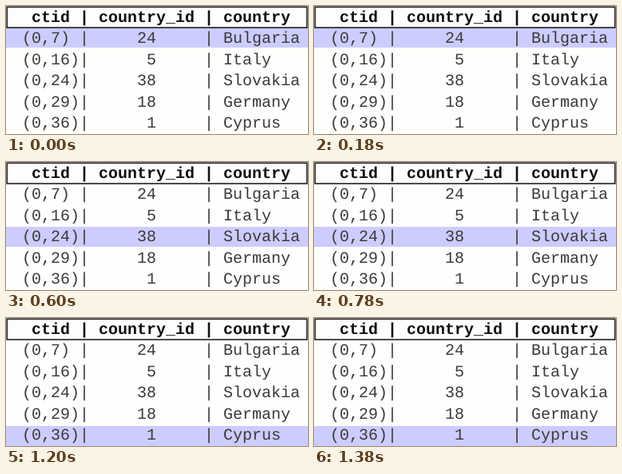
An HTML page for the animation above (1500 ms loop, 378x160 px).

```html
<!DOCTYPE html>
<html lang="en">
<head>
<meta charset="utf-8">
<title>Table scan</title>
<style>
  html, body { margin: 0; width: 100%; height: 100%; overflow: hidden; background: #fdfffc; }
  svg { display: block; }
  text { font: 20px "Liberation Mono", monospace; white-space: pre; fill: #3a3a3a; text-rendering: geometricPrecision; }
  .head { font-weight: bold; fill: #111; }
</style>
</head>
<body>
<svg id="stage" width="378" height="160" viewBox="0 0 378 160">
  <rect id="band" width="378" height="25" fill="#ccccff"/>
  <rect x="1.25" y="1.25" width="375.5" height="25.75" fill="#fdfffc" stroke="#111" stroke-width="1.5"/>
  <text class="head" x="20" y="20"> ctid | country_id | country</text>
</svg>
<script>
const rows = [
  ["(0,7)", 24, "Bulgaria"],
  ["(0,16)", 5, "Italy"],
  ["(0,24)", 38, "Slovakia"],
  ["(0,29)", 18, "Germany"],
  ["(0,36)", 1, "Cyprus"]
];
const STEP = 300, TEXT_PITCH = 26.5, BAND_PITCH = 27;
const stage = document.getElementById("stage");
const band = document.getElementById("band");

rows.forEach(([ctid, id, country], i) => {
  const line = document.createElementNS("http://www.w3.org/2000/svg", "text");
  line.setAttribute("x", 20);
  line.setAttribute("y", Math.floor(20 + TEXT_PITCH * (i + 1)));
  line.textContent = `${ctid.padEnd(6)}|${String(id).padStart(7)}     | ${country}`;
  stage.append(line);
});

// The highlight jumps down one row per step.
function draw(now) {
  const i = Math.floor(now / STEP) % rows.length;
  band.setAttribute("y", BAND_PITCH * (i + 1));
  requestAnimationFrame(draw);
}
draw(performance.now());
</script>
</body>
</html>
```
